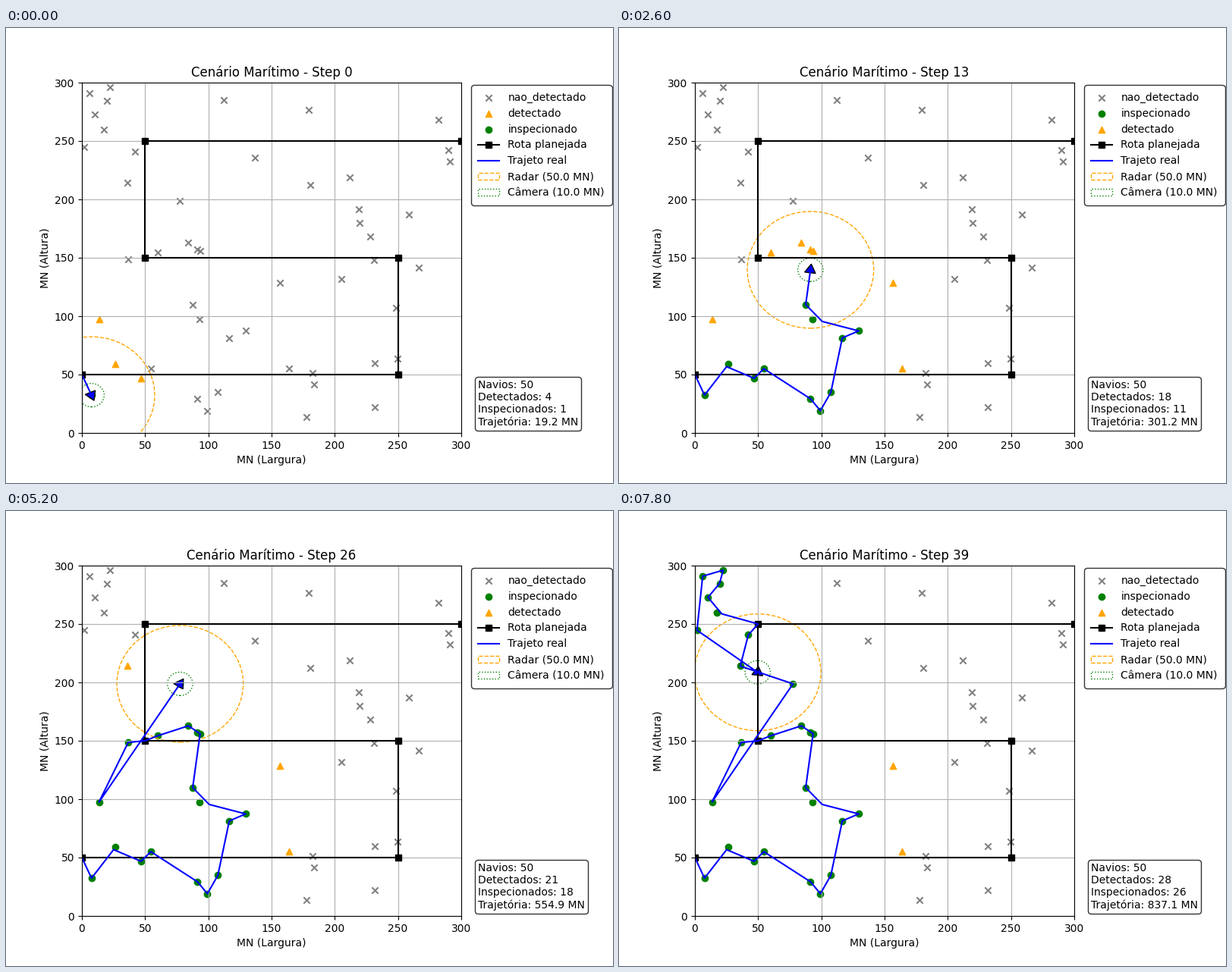
A matplotlib script for the animation above (8000 ms loop, 800 by 600 pixels).

```python
import math

import matplotlib.pyplot as plt
import numpy as np
from matplotlib.animation import FuncAnimation
from matplotlib.offsetbox import AnchoredText
from matplotlib.patches import Circle, RegularPolygon

STEPS, INTERVAL = 40, 200
SIZE, N_SHIPS = 300, 50
RADAR, CAMERA, SPEED = 50.0, 10.0, 30.0
UNSEEN, SEEN, DONE = "nao_detectado", "detectado", "inspecionado"
STYLE = {UNSEEN: ("gray", "x"), SEEN: ("orange", "^"), DONE: ("green", "o")}
BOX = "round,pad=0.3"

ROUTE = [(0, 50), (250, 50), (250, 150), (50, 150), (50, 250), (300, 250)]

np.random.seed(42)
SHIPS = [tuple(p) for p in np.random.rand(N_SHIPS, 2) * SIZE]


def promote(pos, status, old, new, reach):
    """Move every ship within reach from the old status to the new one."""
    for i, ship in enumerate(SHIPS):
        if status[i] == old and math.dist(pos, ship) <= reach:
            status[i] = new


def simulate():
    """Sail to the nearest detected ship or pending waypoint, step by step."""
    pos, dist = ROUTE[0], 0.0
    status = [UNSEEN] * N_SHIPS
    pending = ROUTE[1:]
    path, states = [pos], []
    promote(pos, status, UNSEEN, SEEN, RADAR)
    for _ in range(STEPS):
        goals = [s for s, st in zip(SHIPS, status) if st == SEEN] + pending
        goal = min(goals, key=lambda g: math.dist(pos, g))
        gap = math.dist(pos, goal)
        dx, dy = goal[0] - pos[0], goal[1] - pos[1]
        if gap > SPEED:
            pos = (pos[0] + dx * SPEED / gap, pos[1] + dy * SPEED / gap)
        else:
            pos = goal
            if goal in pending:
                pending.pop(0)  # a skipped corner costs one idle step
        dist += min(gap, SPEED)
        path.append(pos)
        promote(pos, status, UNSEEN, SEEN, RADAR)
        promote(pos, status, SEEN, DONE, CAMERA)
        states.append((list(path), math.atan2(dy, dx), dist, list(status)))
    return states


STATES = simulate()

fig, ax = plt.subplots(figsize=(8, 6), dpi=100)
fig.subplots_adjust(right=0.7499)


def add_info(text):
    box = AnchoredText(text, loc="lower left", pad=0, bbox_to_anchor=(1.03, 0),
                       bbox_transform=ax.transAxes)
    box.patch.set(boxstyle=BOX, edgecolor="black", alpha=0.8)
    ax.add_artist(box)


def draw(step):
    path, heading, dist, status = STATES[step]
    pos = path[-1]
    ax.clear()
    ax.set_xlim(0, SIZE)
    ax.set_ylim(0, SIZE)
    ax.grid(True)
    ax.set_title(f"Cenário Marítimo - Step {step}")
    ax.set_xlabel("MN (Largura)")
    ax.set_ylabel("MN (Altura)")

    for kind in dict.fromkeys(status):
        color, marker = STYLE[kind]
        points = [s for s, st in zip(SHIPS, status) if st == kind]
        ax.scatter(*zip(*points), c=color, marker=marker, label=kind)

    ax.plot(*zip(*ROUTE), "k-s", label="Rota planejada")
    ax.plot(*zip(*path), "b-", label="Trajeto real")
    ax.add_patch(RegularPolygon(pos, 3, radius=5, orientation=heading - math.pi / 2,
                                fc="blue", ec="black"))
    ax.add_patch(Circle(pos, RADAR, fill=False, color="orange", ls="--",
                        label=f"Radar ({RADAR} MN)"))
    ax.add_patch(Circle(pos, CAMERA, fill=False, color="green", ls=":",
                        label=f"Câmera ({CAMERA} MN)"))

    legend = ax.legend(loc="upper left", bbox_to_anchor=(1.02, 1), edgecolor="black")
    legend.get_frame().set_boxstyle(BOX)

    done = status.count(DONE)
    add_info(f"Navios: {N_SHIPS}\n"
             f"Detectados: {status.count(SEEN) + done}\n"
             f"Inspecionados: {done}\n"
             f"Trajetória: {dist:.1f} MN")
    return []


anim = FuncAnimation(fig, draw, frames=STEPS, init_func=lambda: draw(0),
                     interval=INTERVAL, repeat=True, repeat_delay=0)
plt.show()
```
